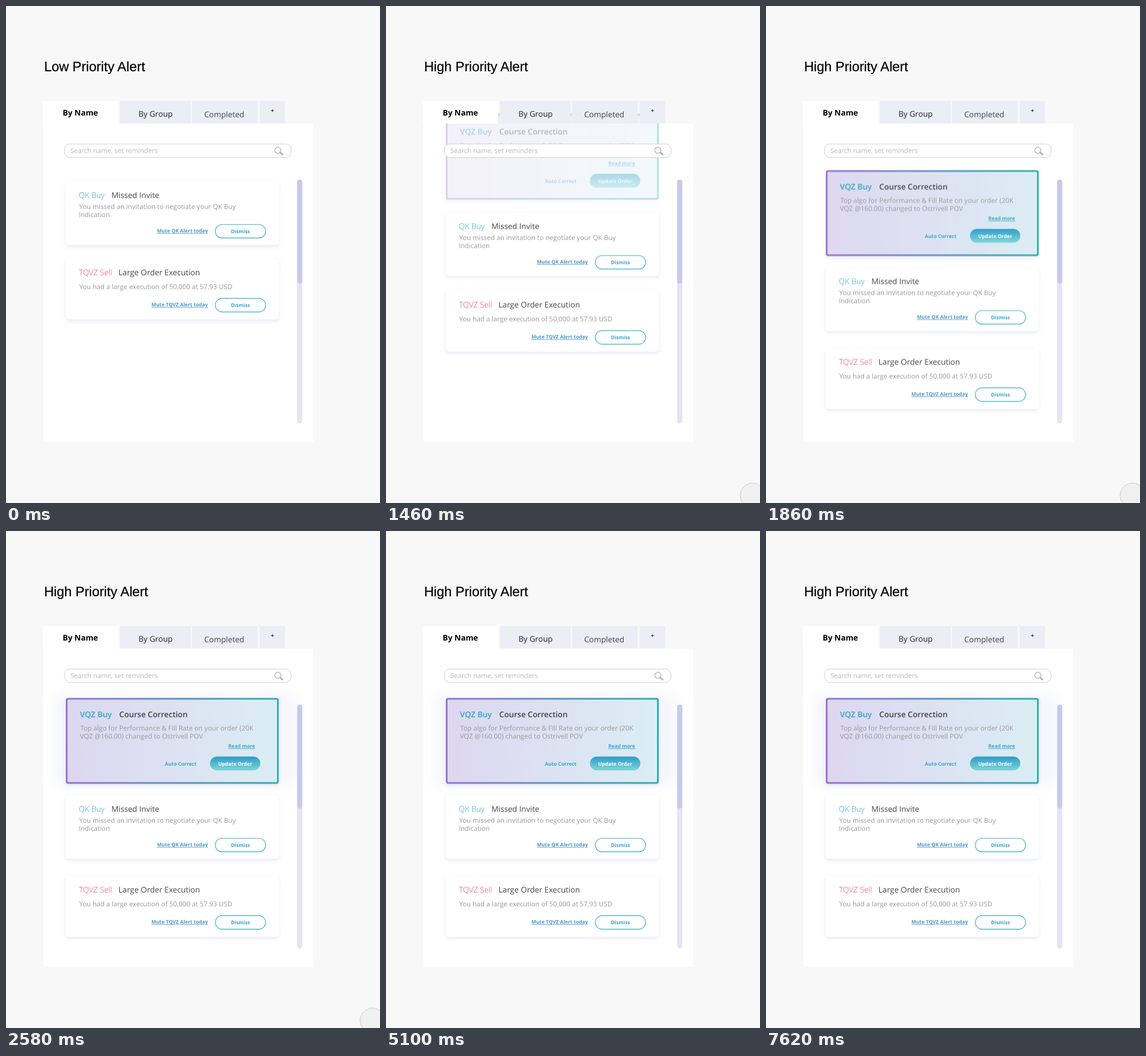
Recreate the animation shown at these times as an HTML page. Size 650 by 862 pixels, loop 8000 ms.

```html
<!DOCTYPE html>
<html lang="en">
<head>
<meta charset="utf-8">
<title>Priority alerts</title>
<style>
  html, body { margin: 0; width: 100%; height: 100%; overflow: hidden; background: #f8f8f8; }
  svg { display: block; width: 650px; height: 862px; }
  text { font: 11.7px "Open Sans", sans-serif; fill: #9a9a9a; white-space: pre; text-rendering: geometricPrecision; }
  .title { font: 23.4px "Liberation Sans", Arial, sans-serif; fill: #000; stroke: #000; stroke-width: .25px; }
  .tab { font-size: 13.65px; fill: #222; }
  .head { font-size: 13.65px; fill: #454545; }
  .bold { font-weight: 700; fill: #000; }
  .semi { font-weight: 600; }
  .light { font-weight: 300; }
  .buy { fill: #2ba5cc; }
  .sell { fill: #ea4369; }
  .small { font-size: 8.7px; font-weight: 700; fill: #3aa5c8; }
  .link { text-decoration: underline; }
  .mute { fill: #4f98cb; }
  .end { text-anchor: end; }
  .mid { text-anchor: middle; }
  .card { fill: #fff; filter: drop-shadow(0 3px 3px rgba(110, 110, 215, .16)); }
  .pill { fill: #fff; stroke: #36abcb; stroke-width: 1.2px; }

  .low, .high, .box, .copy, .down1, .down2, .glow, .touch { animation: 8s linear infinite; }
  .low { animation-name: hide; }
  .high { animation-name: show; }
  .box { --from: -157.5px; animation-name: enter; }
  .copy { --from: -154px; animation-name: enter; }
  .down1 { --to: 154px; animation-name: push; }
  .down2 { --to: 160px; animation-name: push; }
  .glow { animation-name: pulse; filter: blur(12px); }
  .touch { animation-name: touch; }

  @keyframes hide { 0%, 16.249% { opacity: 1 } 16.25%, 100% { opacity: 0 } }
  @keyframes show { 0%, 16.249% { opacity: 0 } 16.25%, 100% { opacity: 1 } }
  @keyframes enter {
    0% { transform: translateY(var(--from)); opacity: 0 }
    16.25% { transform: translateY(var(--from)); opacity: 0; animation-timing-function: ease }
    25.25%, 100% { transform: translateY(0); opacity: 1 }
  }
  @keyframes push {
    0% { transform: translateY(0) }
    16.25% { transform: translateY(0); animation-timing-function: ease }
    25.25%, 100% { transform: translateY(var(--to)) }
  }
  @keyframes pulse {
    0%, 25.75% { opacity: 0 }
    32.25%, 57.249% { opacity: 1 }
    57.25% { opacity: 0 }
    63.75%, 88.749% { opacity: 1 }
    88.75% { opacity: 0 }
    95.25%, 100% { opacity: 1 }
  }
  @keyframes touch {
    0%, 5.75% { opacity: 0 }
    9.25%, 56.75% { opacity: 1 }
    60.25%, 100% { opacity: 0 }
  }
</style>
</head>
<body>
<svg viewBox="0 0 650 862">
  <defs>
    <linearGradient id="edge">
      <stop stop-color="#9772d0"/><stop offset="1" stop-color="#2bb0ac"/>
    </linearGradient>
    <linearGradient id="tint">
      <stop stop-color="#ddd7f0"/><stop offset="1" stop-color="#dbedf4"/>
    </linearGradient>
    <linearGradient id="action" x2="0" y2="1">
      <stop stop-color="#2b9bca"/><stop offset="1" stop-color="#7ed6d5"/>
    </linearGradient>
  </defs>

  <text class="title low" x="66.2" y="112.7">Low Priority Alert</text>
  <text class="title high" x="66.2" y="112.7">High Priority Alert</text>

  <rect x="65" y="204" width="469" height="552" fill="#fff"/>
  <rect class="glow" x="85" y="284" width="420" height="157" rx="6" fill="#f5f6fd"/>

  <g class="down1">
    <rect class="card" x="104" y="304.5" width="370" height="110" rx="5"/>
    <text class="head light buy" x="126.6" y="332.8">QK Buy</text>
    <text class="head" x="183.2" y="332.8">Missed Invite</text>
    <text x="127.2" y="351.5">You missed an invitation to negotiate your QK Buy</text>
    <text x="126.4" y="366.3">Indication</text>
    <text class="small link mute end" x="351" y="393.2">Mute QK Alert today</text>
    <rect class="pill" x="363.8" y="379" width="87.4" height="23.4" rx="11.7"/>
    <text class="small mid" x="407.5" y="394.1">Dismiss</text>
  </g>

  <g class="down2">
    <rect class="card" x="104" y="438" width="370" height="105.8" rx="5"/>
    <text class="head light sell" x="126.8" y="466.8">TQVZ Sell</text>
    <text class="head" x="195.5" y="466.8">Large Order Execution</text>
    <text x="127.2" y="490.8">You had a large execution of 50,000 at 57.93 USD</text>
    <text class="small link mute end" x="351" y="521.2">Mute TQVZ Alert today</text>
    <rect class="pill" x="363.8" y="507.2" width="87.4" height="23.4" rx="11.7"/>
    <text class="small mid" x="407.5" y="522.2">Dismiss</text>
  </g>

  <g class="box">
    <rect class="card" x="104" y="289.5" width="370" height="149" rx="4"/>
    <rect x="105.5" y="291" width="367" height="146" rx="2.5" fill="url(#tint)" stroke="url(#edge)" stroke-width="3"/>
  </g>
  <g class="copy">
    <text class="head semi buy" x="128.6" y="322.9">VQZ Buy</text>
    <text class="head semi" x="196.8" y="322.9">Course Correction</text>
    <text x="129" y="345.6">Top algo for Performance &amp; Fill Rate on your order (20K</text>
    <text x="128.4" y="360.3">VQZ @160.00) changed to Ostrivell POV</text>
    <text class="small link end" x="433" y="376.2">Read more</text>
    <text class="small" x="276" y="406.7">Auto Correct</text>
    <rect x="354.5" y="391.2" width="87.5" height="24" rx="12" fill="url(#action)"/>
    <text class="small mid" x="398.3" y="406.8" style="fill:#fff">Update Order</text>
  </g>

  <rect x="64" y="165" width="131" height="39" fill="#fff"/>
  <g fill="#ebeef5">
    <rect x="198" y="165" width="123" height="38.5"/>
    <rect x="323" y="165" width="114.5" height="38.5"/>
    <rect x="441" y="165" width="44" height="38.5"/>
  </g>
  <text class="tab bold" x="98.6" y="190.2">By Name</text>
  <text class="tab" x="230.2" y="191.6">By Group</text>
  <text class="tab" x="344.4" y="192.8" style="fill:#444">Completed</text>
  <text class="small mid" x="463" y="185" style="fill:#333;font-size:10px">+</text>

  <rect x="101.5" y="239.3" width="394" height="23.4" rx="9.5" fill="#fff" stroke="#cfcfcf"/>
  <text x="111.7" y="255.4" style="fill:#b9b9b9">Search name, set reminders</text>
  <g fill="none" stroke="#b2b2b2" stroke-linecap="round">
    <circle cx="472.5" cy="250.2" r="5.3" stroke-width="1.3"/>
    <path d="M476.8 254.4 480.6 257.6" stroke-width="2.8"/>
  </g>

  <rect x="506" y="301" width="9" height="423" rx="4.5" fill="#e5e3f4"/>
  <rect x="506" y="301" width="9" height="180.5" rx="4.5" fill="#c8caea"/>

  <circle class="touch" cx="637" cy="849" r="21.5" fill="#f0f0f0" stroke="#c8c8c8"/>
</svg>
</body>
</html>
```
